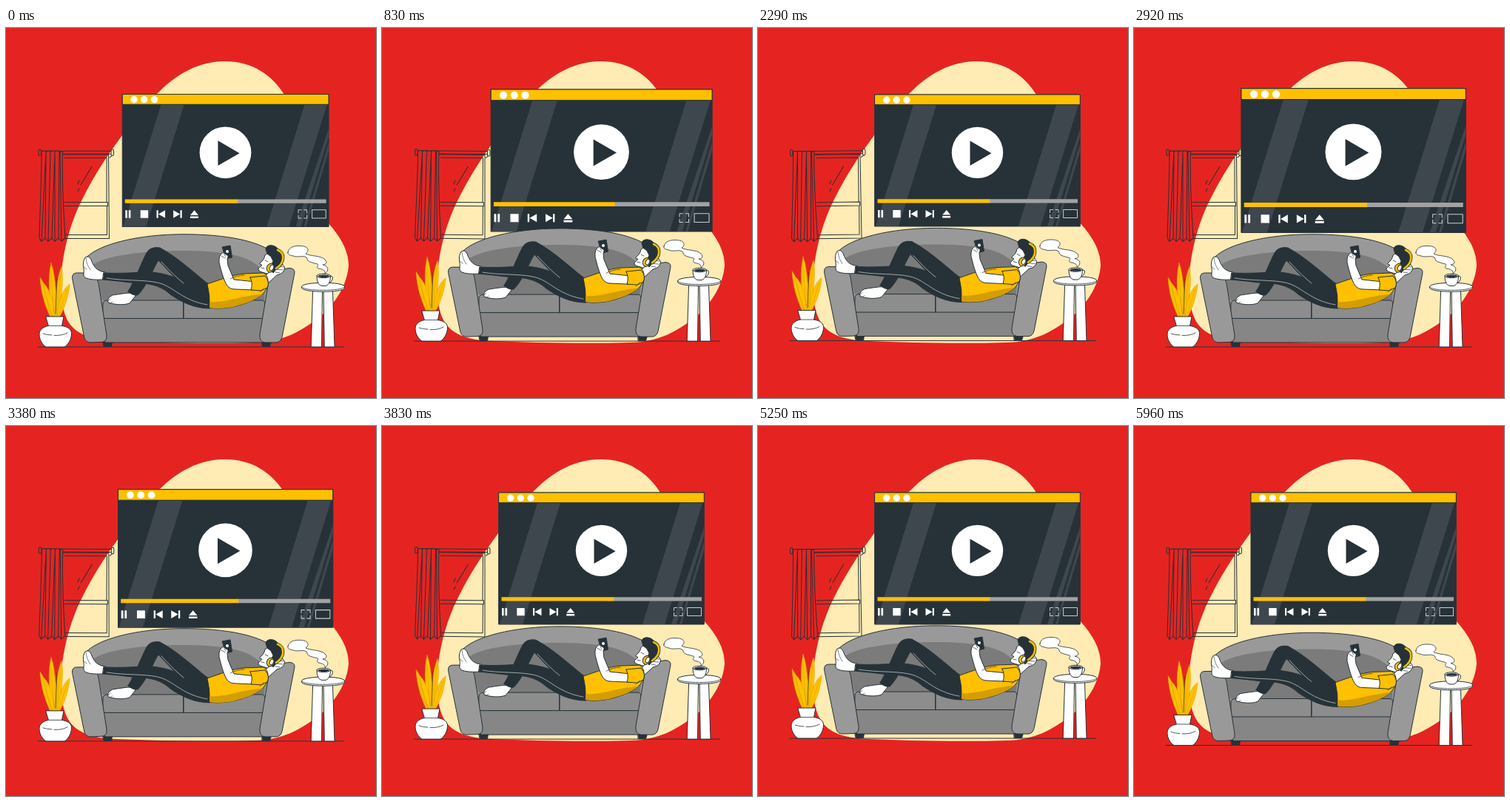
Animation, 500 px wide and 500 px high, one loop 6000 ms. Source, as an HTML page:

```html
<!DOCTYPE html>
<html lang="en">
<head>
<meta charset="utf-8">
<title>Movie on the sofa</title>
<style>
  html, body { margin: 0; width: 100%; height: 100%; overflow: hidden; background: #e52421; }
  svg { display: block; width: 100vw; height: 100vh; }
  .ln { fill: none; }
  .w { fill: #fff; }
  .y { fill: #ffc000; }
  .k { fill: #263238; }
  .g { fill: #999; }
  .flat { stroke: none; }
  .soft { fill: none; stroke: #c9cdcf; }
</style>
</head>
<body>
<svg viewBox="0 0 500 500" stroke="#263238" stroke-linejoin="round" stroke-linecap="round">
  <defs>
    <clipPath id="glass"><path d="M158 104H435.3V268H158z"/></clipPath>
    <clipPath id="tee"><path id="teeShape" d="M272 346C290 340 307 333 322 332L348 331C356 335 356 348 349 357C341 367 318 375 301 378Q284 380 275 378Q276 362 272 346z"/></clipPath>
  </defs>

  <path class="flat" fill="#ffebb4" d="M295 45C333 45 359 63 376 90C397 124 389 170 399 210C406 243 426 252 441 270C455 287 463 304 463 321C461 346 446 373 421 393C400 408 375 425 335 425C270 427 200 425 150 423C122 422 100 417 87 401C75 385 73 357 75 330C78 300 85 272 97 244C114 207 134 176 157 145C174 122 187 105 207 86C232 61 262 45 295 45z"/>

  <g id="window" stroke-width="1">
    <path class="ln" d="M77 171H138.500L139.500 284.500H79M79 175.500H136V235.500M79 235.500H137.500V240.500H79M79 279.500H136.500V240.500M143.500 172L140 175"/>
    <path class="ln" d="M97 221L99 217M101 212L116 187M96.500 211L99 206"/>
    <rect class="ln" x="46" y="166.200" width="97" height="4" rx="1"/>
    <rect fill="#e52421" x="44" y="164" width="3.500" height="8.500" rx="1.700"/>
    <rect fill="#ffebb4" x="142" y="164" width="3.500" height="8.500" rx="1.700"/>
    <path fill="#e52421" d="M48 167Q52 165 54 167Q58 165 60 167Q64 165 66 167Q70 165 72 167L76.500 167C75 205 78 248 80 284L75 288L71 284L66 288.500L62 284L57 288.500L53 284L48 288.500L45 284C46 245 48 205 48 167z"/>
    <path class="ln" d="M54 167L53 284M60 167L57 288M66 167L62 284M66 167L66 288M72 167L71 284M73 167L75 288M54 167L48 288"/>
  </g>

  <g id="screen" stroke-width="1">
    <path class="k" d="M158 90H435.300V268H158z"/>
    <g class="flat" clip-path="url(#glass)" fill="#3f474e">
      <path d="M210 104H241L190 268H159zM403 104H433L382 268H352zM436 134V145L398 268H391zM436 153V164L405 268H402z"/>
    </g>
    <path class="y" d="M158 90H435.300V103.700H158z"/>
    <g class="w flat">
      <circle cx="173.700" cy="97.200" r="4.700"/>
      <circle cx="187.300" cy="97.200" r="4.700"/>
      <circle cx="201" cy="97.200" r="4.700"/>
      <circle cx="296.500" cy="168.400" r="34.700"/>
      <path d="M162 246h2.600v10.300h-2.600zM166.500 246h2.600v10.300h-2.600zM182.300 246h10.400v10.300h-10.400zM204 246h2.200v10.300h-2.200zM215.500 246v10.300l-9-5.100zM226.500 246v10.300l9-5.100zM235.800 246h2.200v10.300h-2.200zM254.700 246l5.500 6.500h-11zM249.200 254h11v2.500h-11z"/>
    </g>
    <path class="k flat" d="M286.500 152.500V186L315.500 169.300z"/>
    <path class="flat" fill="#a2a2a2" d="M313 231.200H432V236.500H313z"/>
    <path class="y flat" d="M161.500 231.200H313.500V236.500H161.500z"/>
    <path class="soft" d="M394.500 249.500v-4h4M402 245.500h4v4M406 252.500v4h-4M398.500 256.500h-4v-4M413 245.500h18.500v11H413z"/>
  </g>

  <g id="room" stroke-width="1">
    <path class="ln" d="M43 431H457"/>

    <!-- sofa -->
    <path class="k" d="M131 424h12.500l-1 6.500h-10zM346 424h12.500l-2 6.500h-10z"/>
    <path class="g" d="M106 313C122 292 180 278.800 240 278.800C298 278.800 344 288 364 306L374 320L358 400H124z"/>
    <path class="flat" fill="#7b7b7b" d="M111 328C118 307 190 301 235 301C300 301 337 308 351 334L349 368H130L124 341z"/>
    <path fill="#868686" d="M128 392H352L348 425H134z"/>
    <path fill="#8d8d8d" d="M131 373Q131 368 137 368H240V392.500H131zM240 368H345Q350 368 350 373V392.500H240z"/>
    <path class="g" d="M89.500 338Q89 331 96 331H113Q122 332 125 345L136 415Q137 424 129 424.500L114 425Q108 425 106 419z"/>
    <path class="g" d="M390 331Q391 325 383 324.500L366 327Q357 330 354.500 345L343 414Q342 424 350 425H365Q371 425 373 418z"/>

    <!-- legs -->
    <path class="w" d="M170 358C161 358 152 360 144 361Q136 365 138 371C147 374 158 375 167 372Q171 367 175 362z"/>
    <path class="ln" d="M141 366l-3 3M144 370l-3 2" stroke-width=".6"/>
    <path class="k" d="M165 356C174 342 182 319 190 304Q195 295 208 297C232 310 252 329 272 345L275 377C253 366 232 341 206 314C199 324 191 348 178 361Q171 362 165 356z"/>
    <path class="w" d="M134 330C125 329 119 325 115 313Q112 307 107 310Q103 316 105 325C106 332 103 335 108 338Q116 341 131 340z"/>
    <path class="ln" d="M108 311Q109 320 114 327M105 323l4 3" stroke-width=".6"/>
    <path class="k" d="M132 331C153 332 173 331 192 329.500C213 331 226 336 241 342L273 345Q277 361 276 379C255 379 238 371 222 360C208 347 192 345 177 345Q153 342 131 340z"/>
    <path d="M136 338C160 342 186 340 204 344C226 348 236 368 272 374M210 316C222 329 231 338 240 345" class="ln" stroke="#d5d8da" stroke-width=".7"/>

    <!-- head, cap and headphones -->
    <path class="w" d="M361 324C366 316 375 318 376.500 324Q376 332 366 334L354 345L346 340z"/>
    <path class="ln" d="M367 322l8 1M365 326l9 1M364 330l6 1" stroke-width=".7"/>
    <path class="w" d="M356 303L350 307Q349 312 347 314L342.500 318.500L346 320.500L341 325Q341 329 346 330L353 332L362 326L368 310z"/>
    <path class="ln" d="M350 314l4 2M345 324l4 1" stroke-width=".8"/>
    <path class="k" d="M351 298C352 293 361 292 366 297C372 301 374 313 370 320L361 331Q355 325 361 315L358 309L353 305z"/>
    <path class="ln" stroke-width="4.300" d="M367 300C377 304 377 317 365 325"/>
    <path class="ln" stroke="#ffc000" stroke-width="2.600" d="M367 300C377 304 377 317 365 325"/>
    <ellipse class="y" cx="357.500" cy="324" rx="5" ry="6" transform="rotate(25 357 324)"/>
    <ellipse class="w" cx="359" cy="324" rx="2.500" ry="4" transform="rotate(25 359 324)"/>

    <!-- shirt, arm and phone -->
    <use href="#teeShape" class="y"/>
    <path class="flat" clip-path="url(#tee)" fill="#d49d00" d="M274 370C297 372 318 361 353 359V382H274z"/>
    <path class="k" d="M292.500 296L303 294L305.500 310L297 312z"/>
    <circle class="w flat" cx="299" cy="302" r="2"/>
    <path class="w" d="M332 342.500L308 340L300 321L299 312Q302 307 297 306L294 303Q287 306 288 317C291 329 294 340 298 347Q302 353 309 353L333 354z"/>
    <path class="ln" d="M294 304l3 5M291 308l5 3" stroke-width=".7"/>
    <path class="y" d="M330 337L350 335Q357 343 353 351L345 355L331 354Q334 345 330 337z"/>
    <path class="ln" d="M303 339C309 336 316 334 322 334M343 357l5-5" stroke-width=".7"/>

    <!-- plant -->
    <g stroke="#d49d00" stroke-width=".5" class="y">
      <path d="M64 391C58 365 56 340 61 317C68 338 68 368 67 391z"/>
      <path d="M66 391C65 362 69 338 75 322C79 342 74 370 69 391z"/>
      <path d="M62 391C61 371 55 349 46 337C47 360 54 378 60 391z"/>
      <path d="M69 391C71 369 76 353 86 346C85 362 79 379 72 391z"/>
      <path d="M63 391C57 373 53 361 51 345C61 355 65 374 66 391z"/>
      <path class="ln" d="M61 330L65 390M74 332L68 390M50 348L62 390M83 352L71 390"/>
    </g>
    <path class="ln" d="M69 339L67 386" stroke-width=".7"/>
    <path class="w" d="M54 390H78L75.500 402.500C85 404 89 408 88.500 414C88 422 83 429 79 431H54C49 428 45 421 45 414C45 408 50 404 57 402.500z"/>
    <path class="ln" d="M57 402.500H75.500M50 413Q55 415 62 415M65 415.500Q76 416 83 412" stroke-width=".8"/>

    <!-- table, cup and steam -->
    <path class="w" d="M415 355H427.500L426.500 431H412.500zM429.500 355H441.500L444 431H430.500z"/>
    <path class="w" d="M399.500 349.500C400 342.500 457 342.500 457.500 349.500V351.500C456 358 401 358 399.500 351.500z"/>
    <path class="ln" d="M399.500 350C402 356 455 356 457.500 350" stroke-width=".8"/>
    <path class="w" d="M437 336Q443 334 441 340Q439 345 434 345"/>
    <path class="w" d="M420 335C420 342 422 348 427 348.500H432C437 347 438.500 341 438.500 335z"/>
    <ellipse class="w" cx="429.300" cy="335" rx="9.300" ry="2.700"/>
    <ellipse class="k flat" cx="429.300" cy="335.300" rx="7.600" ry="1.800"/>
    <path class="w" stroke-width=".8" d="M381 303C382 296 390 294 398 294.500C408 295 411 300 405 305C412 309 425 307 431 313C435 317 432 320 428 320C436 322 437 327 431 332C432 327 427 326 422 325C418 322 424 321 421 319C414 317 406 316 407 311C402 306 394 311 388 308C383 307 380 306 381 303z"/>
  </g>
</svg>
<script>
  const LOOP = 6000, LEAD = 40;
  const pulse = [[0, 1], [40, 1.005], [345, 1.12], [1845, 1], [2340, 1], [3000, 1.1], [3790, 1], [LOOP, 1]];
  const part = id => document.getElementById(id);
  const [view, room, pane] = ["screen", "room", "window"].map(part);

  // Linear value between [time, value] points
  function track(points, t) {
    const i = points.findIndex(p => p[0] > t);
    const [t0, a] = points[i - 1], [t1, b] = points[i];
    return a + (b - a) * (t - t0) / (t1 - t0);
  }

  // Triangle wave: 0 at the ends of a period, 1 in the middle
  const tri = (t, period) => 1 - Math.abs(1 - 2 * (t % period) / period);

  function draw(now) {
    const t = (now + LEAD) % LOOP;
    const sway = 0.6 * (1 - 2 * tri(t + 2250, 3000));
    view.setAttribute("transform", `translate(296.75 179) scale(${track(pulse, t)}) translate(-296.75 -179)`);
    room.setAttribute("transform", `translate(0 ${0.5 - 10 * tri(t, 1500)})`);
    pane.setAttribute("transform", `rotate(${sway} 95 227)`);
  }

  const start = performance.now();
  function tick() {
    draw(performance.now() - start);
    requestAnimationFrame(tick);
  }
  tick();
</script>
</body>
</html>
```
